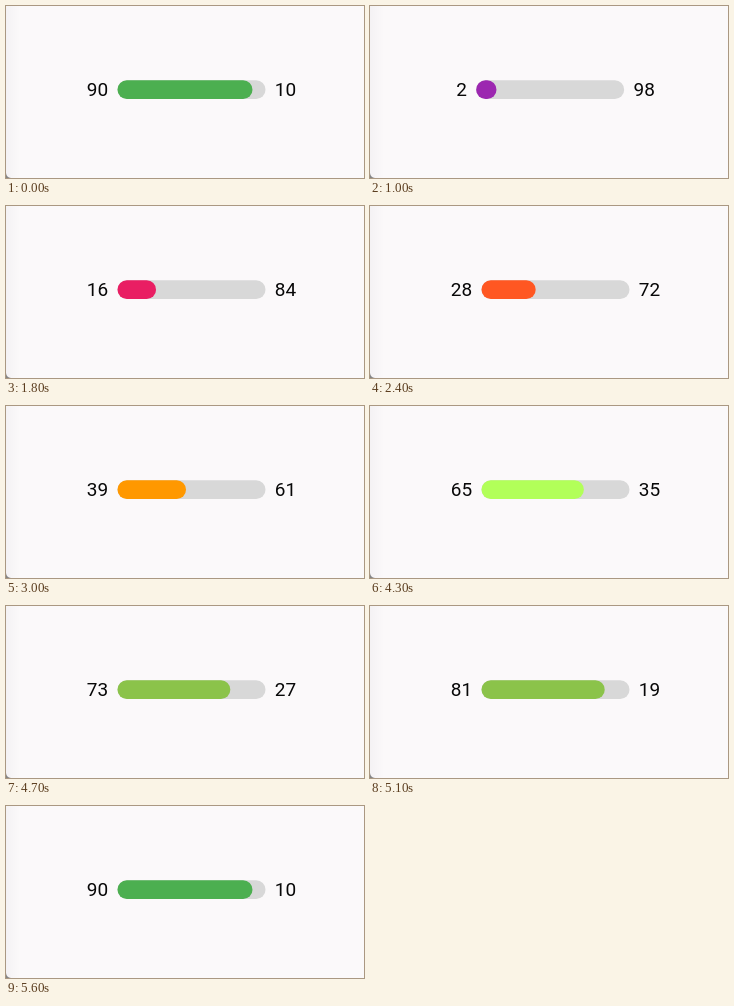
These frames come from a looping animation (358x172 px, 6300 ms). An HTML page:

```html
<!DOCTYPE html>
<html lang="en">
<head>
<meta charset="utf-8">
<title>Split progress bar</title>
<style>
  html, body { margin: 0; width: 100%; height: 100%; overflow: hidden; background: #fbf9fa; }
  svg { display: block; }
  text { font: 19px Roboto, sans-serif; fill: #080808; }
</style>
</head>
<body>
<svg width="358" height="172" viewBox="0 0 358 172">
  <defs>
    <linearGradient id="edge">
      <stop offset="0" stop-color="#f4f2f4"/>
      <stop offset="1" stop-color="#fbf9fa"/>
    </linearGradient>
  </defs>
  <rect width="358" height="172" fill="#fbf9fa"/>
  <rect width="14" height="172" fill="url(#edge)"/>
  <path d="M0 167Q0.5 171.5 5 172H0Z" fill="#858585"/>
  <g id="row">
    <text id="done" x="102.2" y="90.2" text-anchor="end"></text>
    <rect x="111.5" y="74.3" width="148" height="18.7" rx="9.35" fill="#d8d8d8"/>
    <rect id="fill" x="111.5" y="74.3" height="18.7" rx="9.35"/>
    <text id="left" x="268.8" y="90.2"></text>
  </g>
</svg>
<script>
  const LOOP = 6300, START = 1000, STEP = 100, LAST = 46;
  const BAR = 148, CAP = 17.7, DIGIT = 10.67;

  // [step, percent] points of the counter
  const PACE = [[0, 2], [8, 16], [20, 39], [33, 65], [41, 81], [LAST, 90]];

  // one colour per ten percent
  const COLORS = ['#9c27b0', '#e91e63', '#ff5722', '#ff9800', '#ffc107',
                  '#cddc39', '#b2ff59', '#8bc34a', '#8bc34a', '#4caf50'];

  const [row, done, fill, left] = ['row', 'done', 'fill', 'left']
    .map(id => document.getElementById(id));

  function percentAt(ms) {
    if (ms < START) return 90;
    const n = Math.min(LAST, Math.floor((ms - START) / STEP));
    const i = PACE.findIndex(p => p[0] >= n);
    if (PACE[i][0] === n) return PACE[i][1];
    const [n0, v0] = PACE[i - 1], [n1, v1] = PACE[i];
    return Math.round(v0 + (v1 - v0) * (n - n0) / (n1 - n0));
  }

  function draw(ms) {
    const p = percentAt(ms % LOOP);
    done.textContent = p;
    left.textContent = 100 - p;
    fill.setAttribute('width', CAP + (BAR - CAP) * p / 100);
    fill.setAttribute('fill', COLORS[Math.floor(p / 10)]);
    // the row stays centred when a digit is missing
    row.setAttribute('transform', `translate(${p < 10 ? -DIGIT / 2 : 0} 0)`);
  }

  const begin = performance.now();
  function tick() {
    draw(performance.now() - begin);
    requestAnimationFrame(tick);
  }
  tick();
</script>
</body>
</html>
```
